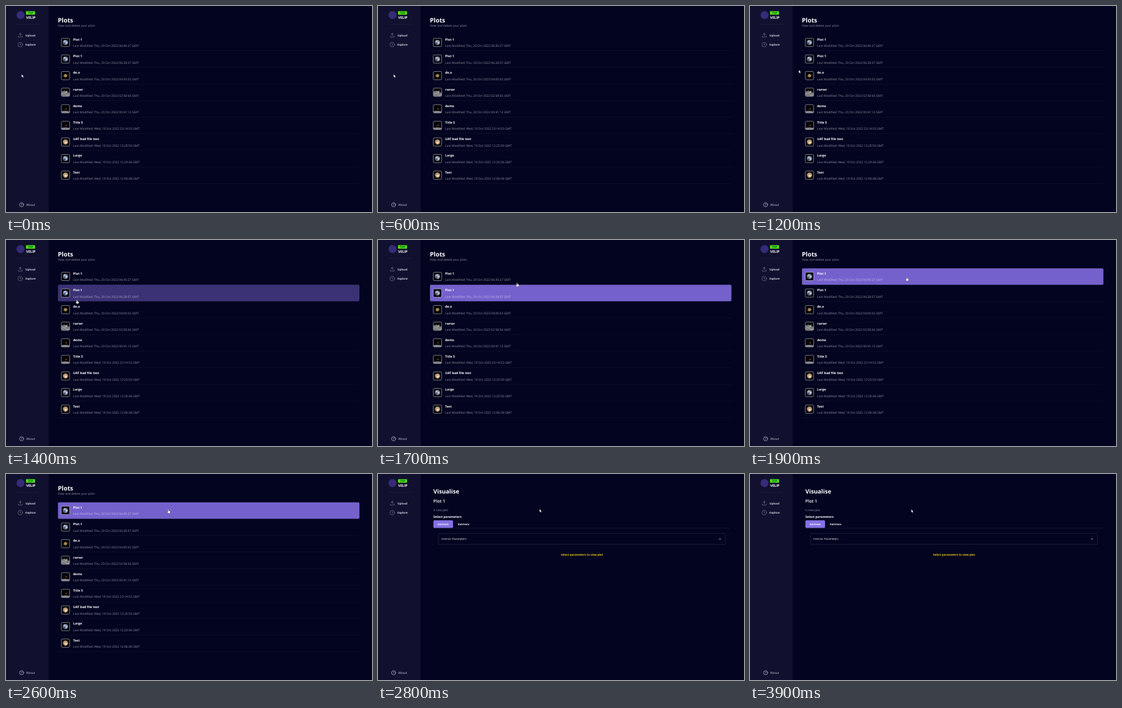
An HTML page for the animation above (4500 ms loop, 600 by 338 pixels).

```html
<!DOCTYPE html>
<html lang="en">
<head>
<meta charset="utf-8">
<title>Plots</title>
<style>
  html, body { margin: 0; width: 100%; height: 100%; overflow: hidden; background: #030420; }
  svg { display: block; width: 100%; height: 100%; }
  text { font-family: "Open Sans", "Noto Sans", sans-serif; fill: #fff; text-rendering: geometricPrecision; white-space: pre; }
  .bold { font-weight: 700; }
  .semi { font-weight: 600; }
  .dim { fill: #fff; fill-opacity: .56; }
  .line { fill: none; stroke: #15172f; stroke-width: .6; }
  .icon { fill: none; stroke: #77778f; stroke-width: .7; stroke-linecap: round; stroke-linejoin: round; }
  .frame { fill: none; stroke: #c9c9d2; stroke-width: .6; }
</style>
</head>
<body>
<svg viewBox="0 0 600 338" preserveAspectRatio="none">
  <defs>
    <clipPath id="thumb"><rect x="-6.8" y="-6.8" width="13.6" height="13.6" rx="1.8"/></clipPath>
    <g id="earth">
      <circle r="4.1" fill="#7888a8"/>
      <path d="M-3.3-2.3Q-1-4 1-3Q-.5-1.3-2.8-.8ZM.2-1Q2.8-2 3.8.4Q2 .8 1.5 2.8Q0 1.5.2-1Z" fill="#c4c8d0"/>
      <path d="M-3.6.7Q-1 .2-.4 1.8Q-.6 3.5-2 3.2Z" fill="#354266"/>
    </g>
    <g id="planet">
      <path d="M-4.6 1.1L4.6-1.1" stroke="#6e5a3c" stroke-width=".7"/>
      <circle r="2.6" fill="#b99a62"/>
      <path d="M-2.4-.5H2.4M-2.3 1H2.3" stroke="#7c6038" stroke-width=".6"/>
    </g>
    <g id="surface">
      <path d="M-7-1Q-3-3 0-1T7 0V7H-7Z" fill="#77777a"/>
      <path d="M-6 3Q-2 1 1 4T7 3" fill="none" stroke="#b0b0b0" stroke-width="1"/>
      <path d="M-3-4L0-1L3-3V1L0 2Z" fill="#a3a3a0"/>
    </g>
    <g id="horizon">
      <path d="M-7 4Q0 2.4 7 4.4V7H-7Z" fill="#85858a"/>
      <circle cx="1" cy="0" r=".9" fill="#c4604a"/>
    </g>
    <g id="dwarf">
      <circle r="4.2" fill="#b8987a"/>
      <path d="M-2 .5Q-1-1.8 .7-.4Q2.6-1.5 3 .5Q2 2.8.2 3.3Z" fill="#ead6b8"/>
      <path d="M-3.8-.2Q-3 2.4-1 3.8Q-3.4 3-4 .6Z" fill="#5f4334"/>
    </g>
  </defs>

  <rect width="600" height="338" fill="#030420"/>
  <rect width="69.5" height="338" fill="#11112f"/>
  <path d="M69.7 0V338" stroke="#1b1b38" stroke-width=".5"/>

  <g id="sidebar">
    <circle cx="23.8" cy="14.8" r="6.6" fill="#352b78"/>
    <rect x="32.8" y="8.4" width="14.8" height="5.8" rx=".8" fill="#49e512"/>
    <path d="M16 30H54" stroke="#25253f" stroke-width=".6"/>
    <path class="icon" d="M23.4 49V45M21.3 46.7L23.4 44.7L25.5 46.7M20.3 49.3V51H26.5V49.3"/>
    <circle class="icon" cx="23.3" cy="63.4" r="3.7"/>
    <path class="icon" d="M23.3 61.3V63.5L24.7 64.3"/>
    <circle class="icon" cx="25.6" cy="326.1" r="3.4" style="stroke:#c4c4cf"/>
  </g>

  <g id="list"></g>

  <g id="detail">
    <path class="line" d="M91 89H578" style="stroke:#20223c"/>
    <rect x="90.8" y="76" width="32.2" height="12.6" rx="1.8" fill="#8471e2"/>
    <rect class="line" x="99.2" y="97.6" width="470.5" height="17.8" rx="1" style="stroke:#2d2f48"/>
    <path d="M559.2 106L560.6 107.3L562 106" fill="none" stroke="#fff" stroke-width=".8"/>
  </g>

  <circle id="ring" cx="264.2" cy="58" r="2.3" fill="#8a8aee" fill-opacity=".25" stroke="#5f63c9" stroke-width=".6"/>
  <path id="arrow" d="M0 0V5L1.2 4L2 5.8L2.9 5.4L2.1 3.7H3.6Z" fill="#fff" stroke="#111" stroke-width=".25"/>
  <path id="hand" d="M-.6.5Q0-.3.6.5V2.4L2.7 3Q3.2 3.3 3 4.2L2.4 6.4H-.4L-2 4.2Q-2 3.2-.6 3.9Z" fill="#fff" stroke="#111" stroke-width=".3"/>
</svg>

<script>
const LOOP = 4500, TICK = 100, PITCH = 27.22;
const OPEN_AT = 2700;
const $ = id => document.getElementById(id);

function add(parent, tag, attrs, text = "") {
  const node = document.createElementNS("http://www.w3.org/2000/svg", tag);
  for (const key in attrs) node.setAttribute(key, attrs[key]);
  node.textContent = text;
  parent.append(node);
  return node;
}
const label = (parent, text, x, y, size, cls = "", extra = {}) =>
  add(parent, "text", { x, y, "font-size": size, class: cls, ...extra }, text);

const sidebar = $("sidebar"), list = $("list"), detail = $("detail");

label(sidebar, "TOP", 40.2, 13, 4.5, "bold", { "text-anchor": "middle", style: "fill:#0d5c16" });
label(sidebar, "VELIP", 33, 20.7, 5.6, "bold");
label(sidebar, "Upload", 32, 49.7, 4.5, "bold", { style: "fill:#d4d4de" });
label(sidebar, "Explore", 32, 65, 4.5, "bold", { style: "fill:#d4d4de" });
label(sidebar, "?", 25.6, 328, 5.2, "semi", { "text-anchor": "middle", style: "fill:#c4c4cf" });
label(sidebar, "About", 33, 328.1, 5.2, "", { style: "fill:#c9c9d4" });

label(list, "Plots", 85, 27, 10.1, "bold");
label(list, "View and delete your plots", 85, 34.4, 4.95, "dim");

const plots = [
  ["Plot 1", "Thu, 20 Oct 2022 06:45:27", "earth"],
  ["Plot 1", "Thu, 20 Oct 2022 06:28:57", "earth"],
  ["de,o", "Thu, 20 Oct 2022 04:05:02", "planet"],
  ["rwrwr", "Thu, 20 Oct 2022 02:58:56", "surface"],
  ["demo", "Thu, 20 Oct 2022 00:41:12", "horizon"],
  ["Title 5", "Wed, 19 Oct 2022 23:14:53", "horizon"],
  ["UAT bad file test", "Wed, 19 Oct 2022 12:25:59", "dwarf"],
  ["Large", "Wed, 19 Oct 2022 12:20:36", "earth"],
  ["Test", "Wed, 19 Oct 2022 12:06:38", "dwarf"]
];

const hovers = plots.map(([title, date, image], i) => {
  const row = add(list, "g", { transform: `translate(0 ${46.4 + i * PITCH})` });
  add(row, "path", { d: "M85 27.1H579", class: "line" });
  const hover = add(row, "rect", { x: 85.2, y: 0, width: 494.2, height: 27, rx: 2, fill: "#7561cc", opacity: 0 });
  const thumb = add(row, "g", { transform: "translate(97.5 13.4)" });
  const picture = add(thumb, "g", { "clip-path": "url(#thumb)" });
  add(picture, "rect", { x: -7, y: -7, width: 14, height: 14, fill: "#040407" });
  add(picture, "use", { href: "#" + image });
  add(thumb, "rect", { x: -6.8, y: -6.8, width: 13.6, height: 13.6, rx: 1.8, class: "frame" });
  label(row, title, 110, 10.5, 5.25, "bold");
  label(row, `Last Modified: ${date} GMT`, 110, 20.9, 5.06, "dim");
  return hover;
});

label(detail, "Visualise", 90.8, 32, 9.6, "bold");
label(detail, "Plot 1", 90.8, 47.3, 7.1, "semi");
label(detail, "A new plot", 90.8, 60.9, 4.95, "dim");
label(detail, "Select parameters", 90.8, 71.8, 5.1, "bold");
label(detail, "Intrinsic", 106.9, 84, 4.4, "bold", { "text-anchor": "middle" });
label(detail, "Extrinsic", 131, 84, 4.4, "bold");
label(detail, "Intrinsic Parameters", 104, 108.1, 4.4);
label(detail, "Select parameters to view plot", 300, 134.2, 4.54, "bold", { style: "fill:#f2cf0c" });

// Pointer tip: time, x, y
const path = [
  [0, 25.6, 112], [800, 25.6, 112], [1200, 80, 105], [1300, 100, 99.5], [1400, 116.3, 98],
  [1600, 185, 85], [1700, 228, 70], [1800, 252, 62.2], [2000, 262, 59.5],
  [2500, 266.3, 58], [2699, 266.3, 58], [2700, 264.8, 57.5], [3799, 264.8, 57.5],
  [3900, 264.4, 58], [LOOP, 264.4, 58]
];
function pointerAt(t) {
  const i = path.findIndex(point => point[0] > t);
  const [t0, x0, y0] = path[i - 1], [t1, x1, y1] = path[i];
  const p = (t - t0) / (t1 - t0);
  return [x0 + (x1 - x0) * p, y0 + (y1 - y0) * p];
}

const fade = (t, start) => {
  const p = Math.min(1, Math.max(0, (t - start) / 200));
  return p * p * (3 - 2 * p);
};
const show = (node, on) => node.style.display = on ? "" : "none";

function draw(time) {
  const t = Math.floor((time % LOOP) / TICK) * TICK;
  const open = t >= OPEN_AT, pointing = t >= 1300 && !open;
  show(list, !open);
  show(detail, open);
  show($("arrow"), !pointing);
  show($("hand"), pointing);
  show($("ring"), t >= 2500 && !open);
  hovers[0].setAttribute("opacity", fade(t, 1700));
  hovers[1].setAttribute("opacity", fade(t, 1300) - fade(t, 1700));
  const [x, y] = pointerAt(t);
  $(pointing ? "hand" : "arrow").setAttribute("transform", `translate(${x} ${y})`);
}

const start = performance.now();
function tick(now) {
  draw(Math.max(0, now - start));
  requestAnimationFrame(tick);
}
draw(0);
requestAnimationFrame(tick);
</script>
</body>
</html>
```
